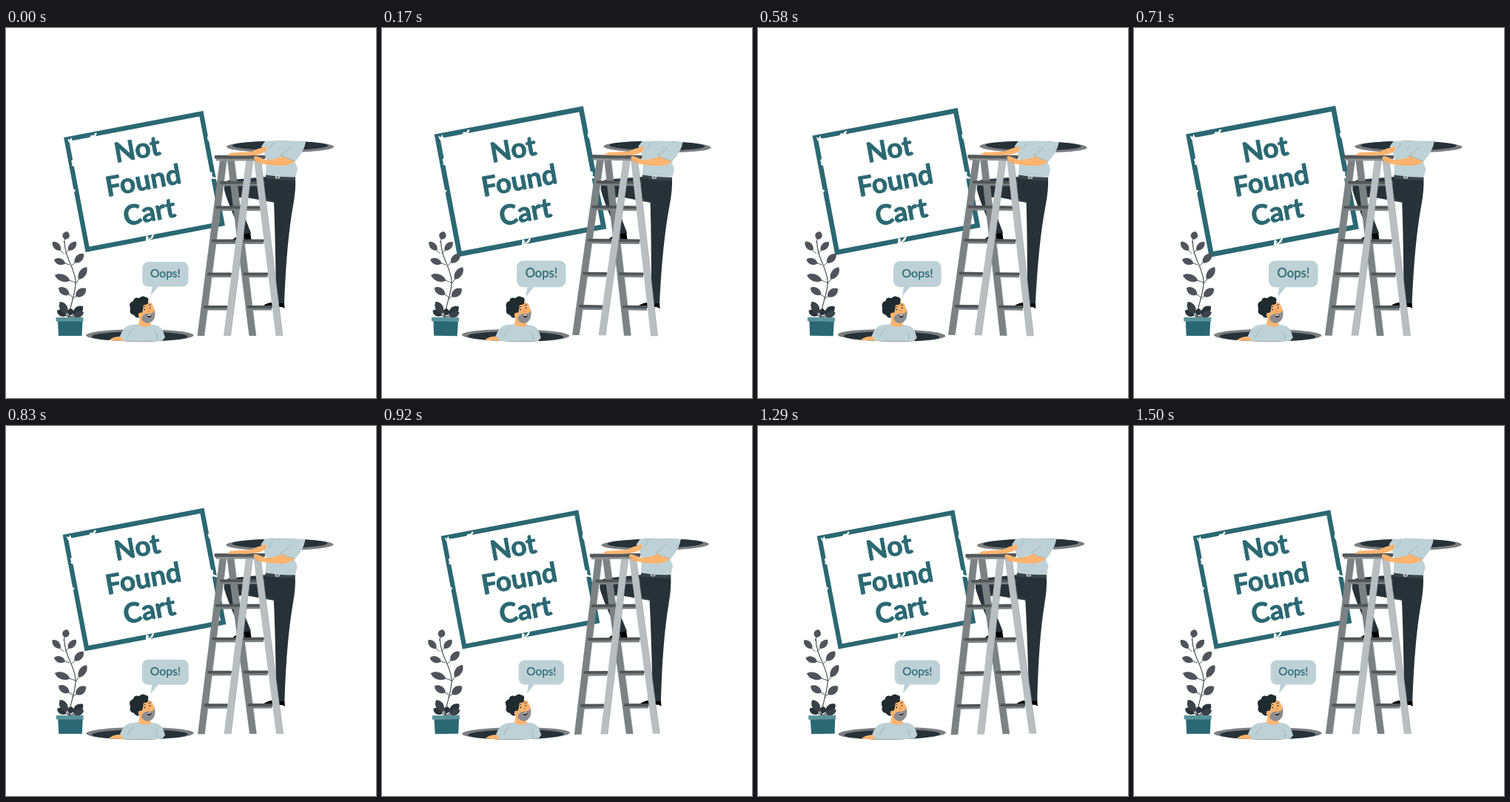
Write an HTML page with a canvas that moves like this. It is 500 px wide and 500 px high and loops after 1.54 s.

```html
<!DOCTYPE html>
<html lang="en">
<head>
<meta charset="utf-8">
<title>Not Found Cart</title>
<style>
html, body { margin: 0; width: 100%; height: 100%; overflow: hidden; background: #fff; }
canvas { display: block; width: 500px; height: 500px; }
</style>
</head>
<body>
<canvas id="stage"></canvas>
<script>
const canvas = document.getElementById('stage');
const ctx = canvas.getContext('2d');
const ratio = window.devicePixelRatio || 1;
canvas.width = canvas.height = 500 * ratio;

const LOOP = 1540;
const TEAL = '#2b6873', PALE = '#bdd1d6', SKIN = '#ffb46e', DARK = '#263238';
const GREY = '#7c8283', SILVER = '#b9bec1', STEP = '#505557', LEAF = '#50545a';

// Two linear beats, then a rest; a beat rises in 247 ms and falls in 200 ms
const PEAKS = [212, 688, 212 + LOOP];

function beat(t) {
  const growth = PEAKS.map(p => 1 - (t < p ? (p - t) / 247 : (t - p) / 200));
  return 1 + .1 * Math.max(0, ...growth);
}

function fill(color, d) {
  ctx.fillStyle = color;
  ctx.fill(new Path2D(d));
}

function line(color, width, d) {
  ctx.strokeStyle = color;
  ctx.lineWidth = width;
  ctx.stroke(new Path2D(d));
}

function oval(color, x, y, rx, ry = rx) {
  ctx.fillStyle = color;
  ctx.beginPath();
  ctx.ellipse(x, y, rx, ry, 0, 0, Math.PI * 2);
  ctx.fill();
}

function box(color, x, y, w, h, r = 0) {
  ctx.fillStyle = color;
  ctx.beginPath();
  ctx.roundRect(x, y, w, h, r);
  ctx.fill();
}

function around(x, y, angle, scale, draw) {
  ctx.save();
  ctx.translate(x, y);
  ctx.rotate(angle);
  ctx.scale(scale, scale);
  ctx.translate(-x, -y);
  draw();
  ctx.restore();
}

function stampFrame() {
  ctx.save();
  ctx.translate(187, 207.5);
  ctx.rotate(-.188);
  ctx.strokeStyle = TEAL;
  ctx.lineWidth = 6.2;
  ctx.lineJoin = 'miter';
  ctx.strokeRect(-91.4, -74.7, 182.8, 149.4);
  // Worn spots
  fill('#fff', 'M-89 -70 L-90 -75 L-87 -73 L-85 -76 L-84 -72 L-80 -71 Z');
  fill('#fff', 'M-61 -71 L-58 -74 L-55 -73 L-52 -76 L-50 -75 L-53 -71 Z');
  fill('#fff', 'M-88 -47 L-90.5 -45 L-90 -41 L-91 -39 L-88 -37 Z');
  fill('#fff', 'M-95 -8 L-92 -6 L-95 -3 Z');
  fill('#fff', 'M-11 71 L-8 74 L-10 77 L-6 75 L-3 72 L0 71 L-3 76 L-8 78 L-13 78 Z');
  fill('#fff', 'M87 3 L91 5 L90 10 L95 13 L95 15 L90 13 L87 14 Z');
  fill('#fff', 'M95 -45 L93 -42 L93.5 -38 L95 -36 Z');
  ctx.restore();
}

function stampText() {
  ctx.font = '700 37px Lato, sans-serif';
  ctx.textAlign = 'center';
  ctx.lineJoin = 'round';
  ctx.lineWidth = .9;
  ctx.fillStyle = ctx.strokeStyle = TEAL;
  ['Not', 'Found', 'Cart'].forEach((word, i) => {
    ctx.save();
    ctx.translate(179.5 + 8.2 * i, 176.5 + 42.3 * i);
    ctx.rotate(-.179);
    ctx.fillText(word, 0, 0);
    ctx.strokeText(word, 0, 0);
    ctx.restore();
  });
}

// Leaf on a bare stalk from (x, y), widest near the tip
function leaf(x, y, tipX, tipY, width, color = LEAF) {
  const dx = tipX - x, dy = tipY - y, len = Math.hypot(dx, dy), base = len * .28;
  ctx.save();
  ctx.translate(x, y);
  ctx.rotate(Math.atan2(dy, dx));
  line(color, .9, `M0 0 H${len * .5}`);
  fill(color, `M${base} 0 C${len * .4} ${-width} ${len * .8} ${-width * 1.3} ${len} 0
    C${len * .8} ${width * 1.3} ${len * .4} ${width} ${base} 0 Z`);
  ctx.restore();
}

function plant() {
  line('#3b4147', 1.1, 'M85 390 C87 372 95 357 94 342 C93 324 79 310 79 288');
  [[78, 290, 83, 275, 5.5], [78, 305, 63, 289, 5], [80, 305, 95, 289, 5],
   [86, 320, 65, 313, 5], [88, 322, 105, 305, 5.5], [94, 344, 66, 334, 5.5],
   [94, 346, 109, 323, 5.5], [91, 364, 71, 351, 5.5], [89, 367, 108, 352, 6]]
    .forEach(l => leaf(...l));
  [[86, 391, 69, 382, 5], [86, 392, 73, 370, 6], [86, 392, 104, 376, 6],
   [86, 392, 105, 384, 5], [86, 392, 88, 379, 5]]
    .forEach((l, i) => leaf(...l, i % 2 ? '#3b4248' : '#2b343b'));
  fill(TEAL, 'M70 396 H103.5 L102.5 416 H71 Z');
  box('#5b939b', 67.5, 391, 37, 5.5);
}

function hole(x, y, rx, ry, lift) {
  oval('#7b7d80', x, y, rx, ry);
  oval(DARK, x, y - lift, rx - 8, ry - Math.abs(lift));
}

function fallenMan() {
  hole(180.8, 415.3, 72.8, 8.2, -1.6);
  ctx.save();
  ctx.clip(new Path2D('M100 340 H260 V416.9 H245.6 A64.8 6.6 0 0 1 116 416.9 H100 Z'));
  fill(SKIN, 'M137 424 Q143 417 153 417 L163 413 L166 422 L154 424 Z');
  fill(PALE, 'M154 416 Q159 403 168 401.5 Q183 399 198 401 Q209 402 212 409 L215 418 L210 424 H160 Z');
  line('#93aab0', .7, 'M164 418 Q167 410 173 405 M204 421 Q205 415 202 410');
  ctx.restore();
  fill(SKIN, 'M181 390 L179 401 Q186 406 196 402 L194 394 Z');
  fill(SKIN, 'M180 374 Q190 368 197 372 L201 381 Q203 391 195 397 Q186 397 181 390 Z');
  fill('#8b8d90', 'M184 390 Q188 385 194 386 Q199 386 201 381 Q203 392 197 397 Q188 402 183 393 Z');
  fill('#202b30', `M168 379 Q165 371 172 369 Q173 363 180 365 Q185 361 188 363.5
    Q194 364 192 370 Q193 374 187 374 L185 376 Q186 382 183 385 L181 391
    Q176 393 173 388 Q166 387 168 379 Z`);
  oval(SKIN, 181.5, 388, 2.6, 3.2);
  oval(DARK, 187.5, 380.5, .8, 1.1);
  oval(DARK, 194.5, 378, .8, 1.1);
  line(DARK, .9, 'M185 377.5 L188.5 376 M192.5 374.5 L196 374');
  line('#d98747', .8, 'M191.5 379 L194 383 L191 384');
  fill('#3b2525', 'M190 388 Q194 389 197 386 Q197 391 193 391.5 Q191 391 190 388 Z');
  line('#fff', 1, 'M191 388.5 Q194 389 196.5 387');
}

function bubble() {
  box(PALE, 184.7, 316.4, 61.2, 33, 8);
  fill(PALE, 'M198 348 L196 361.5 L207 348 Z');
  ctx.font = '400 15.3px Lato, sans-serif';
  ctx.textAlign = 'center';
  ctx.lineWidth = .25;
  ctx.fillStyle = ctx.strokeStyle = TEAL;
  ctx.fillText('Oops!', 215.4, 337);
  ctx.strokeText('Oops!', 215.4, 337);
}

function step(x, y, w) {
  box(GREY, x + 1, y + 2, w - 2, 4.6);
  box(STEP, x, y, w, 3.8, 1.5);
}

function rail(color, x, foot) {
  fill(color, `M${x} 178 H${x + 9.5} L${foot + 9.5} 416 H${foot} Z`);
  line('#8c9193', .5, `M${x + 9.5} 178 L${foot + 9.5} 416`);
}

function legs() {
  fill('#000', 'M306 286 Q312 281 317 280 L320 275 H330 L331.5 286 Z');
  fill(DARK, 'M352 201 H391 L363 236 L325 229 Q314 228 313 231 L331 277 L319 279 Q300 238 295 219 Q294 205 306 205 Z');
  fill('#000', 'M348 375 Q356 370 363 371 L376 371 L376.5 379 L373 377 L349 376.5 Z');
  fill(DARK, 'M351 203 H391 Q392 218 388 240 Q379 290 376 372 H365 Q364 280 362 235 Z');
  line('#48545a', .8, 'M364 236 Q355 232 348 231');
}

function ladder() {
  rail(GREY, 299, 328.5);
  rail(GREY, 289, 258.5);
  [[305, 207, 45], [310, 240.5, 40], [315, 285.5, 34], [320.5, 330.5, 34], [326, 375, 34]]
    .forEach(s => step(...s));
  [[289, 207, 34], [283, 240.5, 36], [278, 285.5, 33], [272, 330.5, 33], [267, 375, 33]]
    .forEach(s => step(...s));
  rail(SILVER, 324.5, 294);
  rail(SILVER, 335, 364.5);
  box('#8e9394', 284, 175, 65, 4.5);
  box('#54585a', 282, 172, 68.5, 4.8, 1);
}

function torso() {
  fill(PALE, 'M350 153 Q376 151.5 405 153.5 Q403 166 390 180 L394 190 L391 203 L351 200 L352 178 L349 168 L345 160 Z');
  line('#8fa5ab', .6, 'M377 171 Q381 164 386 159 M355 164 Q359 160 361 155');
  fill('#394449', 'M351 198.5 Q371 202 391 201.5 L391 206 Q371 206 351 203.5 Z');
  box('#d2d9db', 364, 199.5, 6, 4, 1);
  box('#394449', 365.5, 200.7, 3, 1.6);
}

function arms() {
  fill(SKIN, 'M352 160 Q342 162 332 167 Q318 168 305 168.5 Q300 170 300 172.5 H322 Q340 173 349 168 Q354 165 352 160 Z');
  fill(SKIN, 'M373 173 Q367 178 350 178 L341 174 Q335 172 335 175 Q336 181 344 183 Q359 186.5 376 186 Q388 184 391 179 Z');
  fill(PALE, 'M376 153 L405 153.5 Q403 167 391 180 Q381 177 371 172 Z');
  line('#8fa5ab', .6, 'M391 180 Q381 177 371 172 Q379 168 385 160');
  line('#dd914f', .6, 'M337 178 L344 179 M338 181 L343 181.5');
}

function climber() {
  hole(370.5, 160.5, 72.6, 7.8, 1.6);
  legs();
  torso();
  ladder();
  arms();
}

function render(now) {
  const t = now % LOOP;
  const tilt = Math.sin(t / LOOP * Math.PI * 2) * Math.PI / 180;
  const pulse = beat(t);
  ctx.setTransform(ratio, 0, 0, ratio, 0, 0);
  ctx.fillStyle = '#fff';
  ctx.fillRect(0, 0, 500, 500);
  around(187, 207.5, 0, pulse, stampFrame);
  stampText();
  around(86, 345, tilt, 1, plant);
  around(181, 393, tilt, 1, fallenMan);
  around(215.4, 339, 0, pulse, bubble);
  around(351, 284, tilt, 1, climber);
}

const start = performance.now();
function tick() {
  render(performance.now() - start);
  requestAnimationFrame(tick);
}
tick();
</script>
</body>
</html>
```
